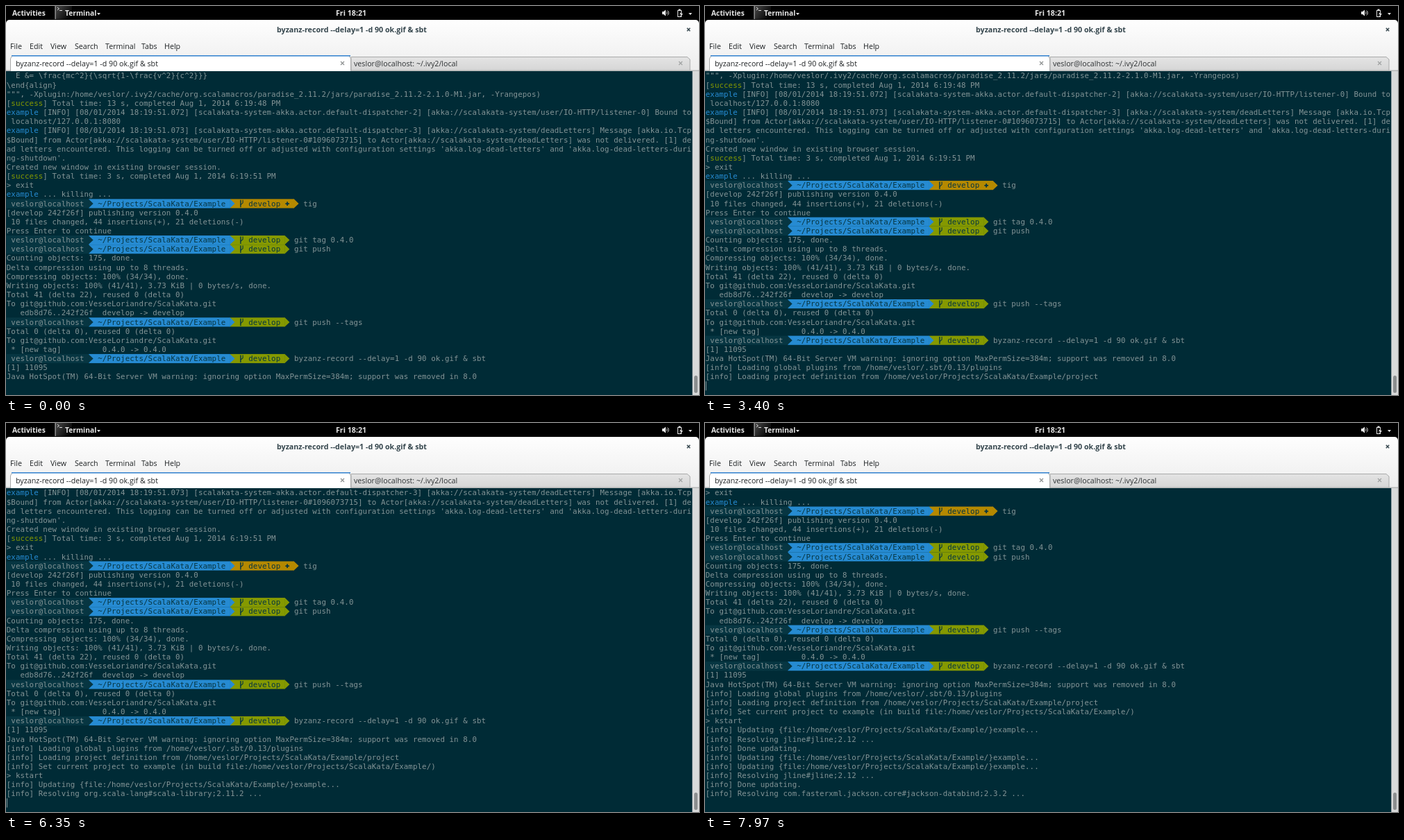
An HTML page with a canvas for the animation above (8 s loop, 998 by 561 pixels).

```html
<!DOCTYPE html>
<html lang="en">
<head>
<meta charset="utf-8">
<title>Terminal session</title>
<style>
  html, body { margin: 0; width: 100%; height: 100%; overflow: hidden; background: #002b36; }
  canvas { display: block; }
</style>
</head>
<body>
<canvas id="stage" width="998" height="561"></canvas>
<script>
const ctx = document.getElementById('stage').getContext('2d');
const LOOP = 8000;

// The desktop is 1366 px wide, shown on a 998 px stage; cells are 9 x 18.
const S = 998 / 1366;
const CELL_W = 9 * S, CELL_H = 18 * S;
const LEFT = S, TOP = 129 * S;
const COLS = 150, ROWS = 35;

const BG = '#002b36', FG = '#839496', PANEL = '#073642';
const BLUE = '#268bd2', GREEN = '#859900', YELLOW = '#b58900';
const MONO = '10.8px "DejaVu Sans Mono", monospace';
const UI = '10.7px "Open Sans", sans-serif';
const UI_BOLD = 'bold 10.7px "Open Sans", sans-serif';

const USER = 'veslor', OWNER = 'VesseLoriandre';
const HOME = `/home/${USER}`;
const PROJECT = `${HOME}/Projects/ScalaKata/Example/`;
const RECORD = 'byzanz-record --delay=1 -d 90 ok.gif & sbt';
const REMOTE = `To git@github.com:${OWNER}/ScalaKata.git`;
const ACTOR = 'akka://scalakata-system';

const prompt = (command, dirty = false) => ({ command, dirty });
const wrap = line => line.match(new RegExp(`.{1,${COLS}}`, 'g'));
const logHead = (ms, n) =>
  `example [INFO] [08/01/2014 18:19:51.${ms}] [scalakata-system-akka.actor.default-dispatcher-${n}] `;

const history = [
  String.raw`  E &= \frac{mc^2}{\sqrt{1-\frac{v^2}{c^2}}}`,
  String.raw`\end{align}`,
  `""", -Xplugin:${HOME}/.ivy2/cache/org.scalamacros/paradise_2.11.2/jars/paradise_2.11.2-2.1.0-M1.jar, -Yrangepos)`,
  '[success] Total time: 13 s, completed Aug 1, 2014 6:19:48 PM',
  `${logHead('072', 2)}[${ACTOR}/user/IO-HTTP/listener-0] Bound to localhost/127.0.0.1:8080`,
  `${logHead('073', 3)}[${ACTOR}/deadLetters] Message [akka.io.Tcp$Bound] from Actor[${ACTOR}/user/IO-HTTP/listener-0#1096073715] to Actor[${ACTOR}/deadLetters] was not delivered. [1] dead letters encountered. This logging can be turned off or adjusted with configuration settings 'akka.log-dead-letters' and 'akka.log-dead-letters-during-shutdown'.`,
  'Created new window in existing browser session.',
  '[success] Total time: 3 s, completed Aug 1, 2014 6:19:51 PM',
  '> exit',
  'example ... killing ...',
  prompt('tig', true),
  '[develop 242f26f] publishing version 0.4.0',
  ' 10 files changed, 44 insertions(+), 21 deletions(-)',
  'Press Enter to continue',
  prompt('git tag 0.4.0'),
  prompt('git push'),
  'Counting objects: 175, done.',
  'Delta compression using up to 8 threads.',
  'Compressing objects: 100% (34/34), done.',
  'Writing objects: 100% (41/41), 3.73 KiB | 0 bytes/s, done.',
  'Total 41 (delta 22), reused 0 (delta 0)',
  REMOTE,
  '   edb8d76..242f26f  develop -> develop',
  prompt('git push --tags'),
  'Total 0 (delta 0), reused 0 (delta 0)',
  REMOTE,
  ' * [new tag]         0.4.0 -> 0.4.0',
  prompt(RECORD),
  '[1] 11095',
  'Java HotSpot(TM) 64-Bit Server VM warning: ignoring option MaxPermSize=384m; support was removed in 8.0',
].flatMap(line => typeof line === 'string' ? wrap(line) : [line]);

const info = text => `[info] ${text}`;
const RESOLVING = info('Resolving ');
const resolve = name => `${RESOLVING}${name} ...`;
const resolveSeries = (start, step, names) =>
  names.map((name, i) => [start + step * i, resolve(name)]);
const updating = info(`Updating {file:${PROJECT}}example...`);
const done = info('Done updating.');
const scala = name => `org.scala-lang#scala-${name};2.11.2`;
const spray = name => `io.spray#spray-${name}_2.11;1.3.1`;
const akka = name => `com.typesafe.akka#akka-${name}_2.11;2.3.4`;
const XML = 'org.scala-lang.modules#scala-xml_2.11;1.0.2';
const JLINE = 'jline#jline;2.12';

const output = [
  [2410, info(`Loading global plugins from ${HOME}/.sbt/0.13/plugins`)],
  [3400, info(`Loading project definition from ${PROJECT}project`)],
  [4020, info(`Set current project to example (in build file:${PROJECT})`)],
  [6100, '> kstart'],
  [6350, updating],
  [6350, resolve(scala('library'))],
  ...resolveSeries(6420, 50, [scala('compiler'), scala('reflect'), XML,
    'org.scala-lang.modules#scala-parser-combinators_2.11;1.0.1', JLINE]),
  [6930, done], [6930, updating], [6930, updating],
  ...resolveSeries(6930, 40, [scala('library'), spray('can'), spray('http')]),
  ...resolveSeries(7160, 50, [spray('util'), 'org.parboiled#parboiled-scala_2.11;1.1.6']),
  ...resolveSeries(7480, 41, [akka('actor'), scala('compiler'), scala('reflect'), XML, JLINE]),
  [7685, done],
  ...resolveSeries(7685, 41, [scala('library'), spray('routing'), akka('slf4j'),
    'com.typesafe#config;1.2.1', scala('reflect')]),
  [7929, resolve('com.fasterxml.jackson.core#jackson-core;2.3.2')],
  [7970, resolve('com.fasterxml.jackson.core#jackson-databind;2.3.2')],
];
const keyTimes = [4700, 4790, 4940, 5190, 5230, 5480];
const blinkTimes = [440, 1040, 1640, 2240, 2830, 3480, 4020, 4610, 4700, 6660, 7270, 7888];

const countPast = (times, t) => times.filter(time => time <= t).length;

function stateAt(t) {
  const lines = [...history];
  for (const [time, text] of output) {
    if (time > t) break;
    const last = lines[lines.length - 1];
    // A resolving line is overwritten by the next one.
    if (text.startsWith(RESOLVING) && String(last).startsWith(RESOLVING)) lines.pop();
    lines.push(text);
  }
  const typing = t >= 4120 && t < 6100;
  return {
    rows: lines.slice(1 - ROWS),
    input: typing ? '> ' + 'kstart'.slice(0, countPast(keyTimes, t)) : '',
    cursor: countPast(blinkTimes, t) % 2 === 1,
  };
}

const colX = col => LEFT + col * CELL_W;
const rowY = row => TOP + row * CELL_H;

function rect(x, y, w, h, color) {
  ctx.fillStyle = color;
  ctx.fillRect(x, y, w, h);
}

function polygon(points, color) {
  ctx.fillStyle = color;
  ctx.beginPath();
  points.forEach(([x, y]) => ctx.lineTo(x, y));
  ctx.fill();
}

function stroke(points, color, width) {
  ctx.strokeStyle = color;
  ctx.lineWidth = width;
  ctx.beginPath();
  points.forEach(([x, y], i) => i ? ctx.lineTo(x, y) : ctx.moveTo(x, y));
  ctx.stroke();
}

function label(text, x, y, color, font = UI) {
  ctx.font = font;
  ctx.fillStyle = color;
  ctx.fillText(text, x, y);
}

function cross(x, y, r, color, width) {
  stroke([[x - r, y - r], [x + r, y + r]], color, width);
  stroke([[x + r, y - r], [x - r, y + r]], color, width);
}

function gradient(y0, y1, from, to) {
  const fill = ctx.createLinearGradient(0, y0, 0, y1);
  fill.addColorStop(0, from);
  fill.addColorStop(1, to);
  return fill;
}

function cells(text, col, row, color = FG) {
  ctx.font = MONO;
  ctx.fillStyle = color;
  [...text].forEach((ch, i) => {
    if (ch !== ' ') ctx.fillText(ch, colX(col + i), rowY(row) + 10.2);
  });
}

function segment(from, to, row, color) {
  const y = rowY(row), x = colX(to);
  rect(colX(from), y, x - colX(from), CELL_H, color);
  polygon([[x - 0.3, y], [x + CELL_W, y + CELL_H / 2], [x - 0.3, y + CELL_H]], color);
}

function drawPrompt({ command, dirty }, row) {
  const end = dirty ? 63 : 61;
  const y = rowY(row), bx = colX(51);
  segment(49, end, row, dirty ? YELLOW : GREEN);
  segment(18, 49, row, BLUE);
  segment(0, 18, row, PANEL);
  cells(`${USER}@localhost`, 1, row);
  cells('~/Projects/ScalaKata/Example', 20, row, PANEL);
  cells('develop', 53, row, PANEL);
  stroke([[bx + 1.8, y + 1.5], [bx + 1.8, y + 12]], PANEL, 1.4);
  stroke([[bx + 1.8, y + 8.5], [bx + 5, y + 5.5], [bx + 5, y + 1.5]], PANEL, 1.1);
  if (dirty) {
    const px = colX(61) + 3.3, py = y + 6.8;
    rect(px - 2.8, py - 0.9, 5.6, 1.8, PANEL);
    rect(px - 0.9, py - 2.8, 1.8, 5.6, PANEL);
  }
  cells(command, end + 2, row);
}

function drawLine(line, row) {
  if (typeof line !== 'string') return drawPrompt(line, row);
  cells(line, 0, row);
  const tinted = (word, col, color) => {
    rect(colX(col), rowY(row), word.length * CELL_W, CELL_H, BG);
    cells(word, col, row, color);
  };
  if (line.startsWith('example')) tinted('example', 0, BLUE);
  if (line.startsWith('[success]')) tinted('success', 1, GREEN);
}

function drawTopBar() {
  rect(0, 0, 998, 32, '#000');
  const shade = ctx.createLinearGradient(72, 0, 94, 14);
  shade.addColorStop(0, '#4a4a4a');
  shade.addColorStop(1, '#000');
  rect(71, 0, 24, 19, shade);
  rect(70.5, 0, 1, 19, '#c8c8c8');
  stroke([[74, 2], [76.5, 4], [74, 6]], '#ddd', 1);
  rect(77, 6, 4, 1, '#ddd');
  label('Activities', 9, 14, '#e6e6e6', UI_BOLD.replace('10.7', '10.3'));
  label('Terminal', 85, 14, '#e6e6e6', UI_BOLD.replace('10.7', '10.3'));
  label('Fri 18:21', 475, 14, '#e6e6e6', UI_BOLD);
  polygon([[131, 10], [136, 10], [133.5, 13]], '#e6e6e6');
  polygon([[983, 10], [988, 10], [985.5, 13]], '#e6e6e6');
  polygon([[945, 8], [947, 8], [950, 5.5], [950, 14.5], [947, 12], [945, 12]], '#e6e6e6');
  ctx.strokeStyle = '#e6e6e6';
  ctx.lineWidth = 1;
  [2, 4.3].forEach(r => {
    ctx.beginPath();
    ctx.arc(950, 10, r, -0.9, 0.9);
    ctx.stroke();
  });
  ctx.strokeRect(967.5, 6.5, 5, 9);
  rect(968.5, 4.5, 3, 2, '#e6e6e6');
  polygon([[973, 8], [970, 12], [972, 12], [971, 16], [975, 11], [973, 11]], '#e6e6e6');
}

function drawWindow() {
  ctx.fillStyle = gradient(20, 93, '#fefefe', '#ededed');
  ctx.beginPath();
  ctx.roundRect(0, 20, 998, 74, [5, 5, 0, 0]);
  ctx.fill();
  label(RECORD, 390, 38, '#35464d', UI_BOLD);
  cross(983, 34, 2.2, '#35464d', 1.5);
  const menu = { File: 6, Edit: 34, View: 64, Search: 99, Terminal: 143, Tabs: 195, Help: 228 };
  for (const [name, x] of Object.entries(menu)) label(name, x, 62, '#1e2224');

  const idleTab = [[497, 93], [497, 73.5], [981, 73.5], [985, 77], [985, 93]];
  polygon(idleTab, gradient(73, 93, '#e4e4e4', '#d6d6d6'));
  stroke(idleTab, '#a9aaaa', 1);
  rect(0, 92.5, 998, 1.5, '#b5b6b6');
  const activeTab = [[6.5, 94], [6.5, 76], [9, 71.5], [494, 71.5], [496.5, 76], [496.5, 94]];
  polygon(activeTab, '#fff');
  stroke(activeTab, '#a9aaaa', 1);
  rect(8, 71, 488, 1.6, '#3b86d0');
  label(RECORD, 14, 87, '#1e2224');
  label(`${USER}@localhost: ~/.ivy2/local`, 501, 87, '#2e3234');
  cross(484.5, 82.5, 2.5, '#8d9091', 1.2);
  cross(971.5, 82.5, 2.5, '#a0a3a3', 1.2);
}

function drawTerminal({ rows, input, cursor }) {
  rect(0, 94, 988.5, 467, BG);
  rect(988.5, 94, 9.5, 467, '#d9dada');
  ctx.fillStyle = '#8b8e8f';
  ctx.beginPath();
  ctx.roundRect(991, 533, 5, 25, 2.5);
  ctx.fill();
  rows.forEach(drawLine);
  cells(input, 0, ROWS - 1);
  if (cursor) rect(Math.floor(colX(input.length) + S / 2), rowY(ROWS - 1), 1, CELL_H, FG);
}

let shown = '';
function frame(now) {
  const state = stateAt(now % LOOP);
  const key = JSON.stringify(state);
  if (key !== shown) {
    shown = key;
    drawTopBar();
    drawWindow();
    drawTerminal(state);
  }
  requestAnimationFrame(frame);
}

const begin = performance.now();
frame(0);
function tick() {
  requestAnimationFrame(tick);
}
</script>
</body>
</html>
```
